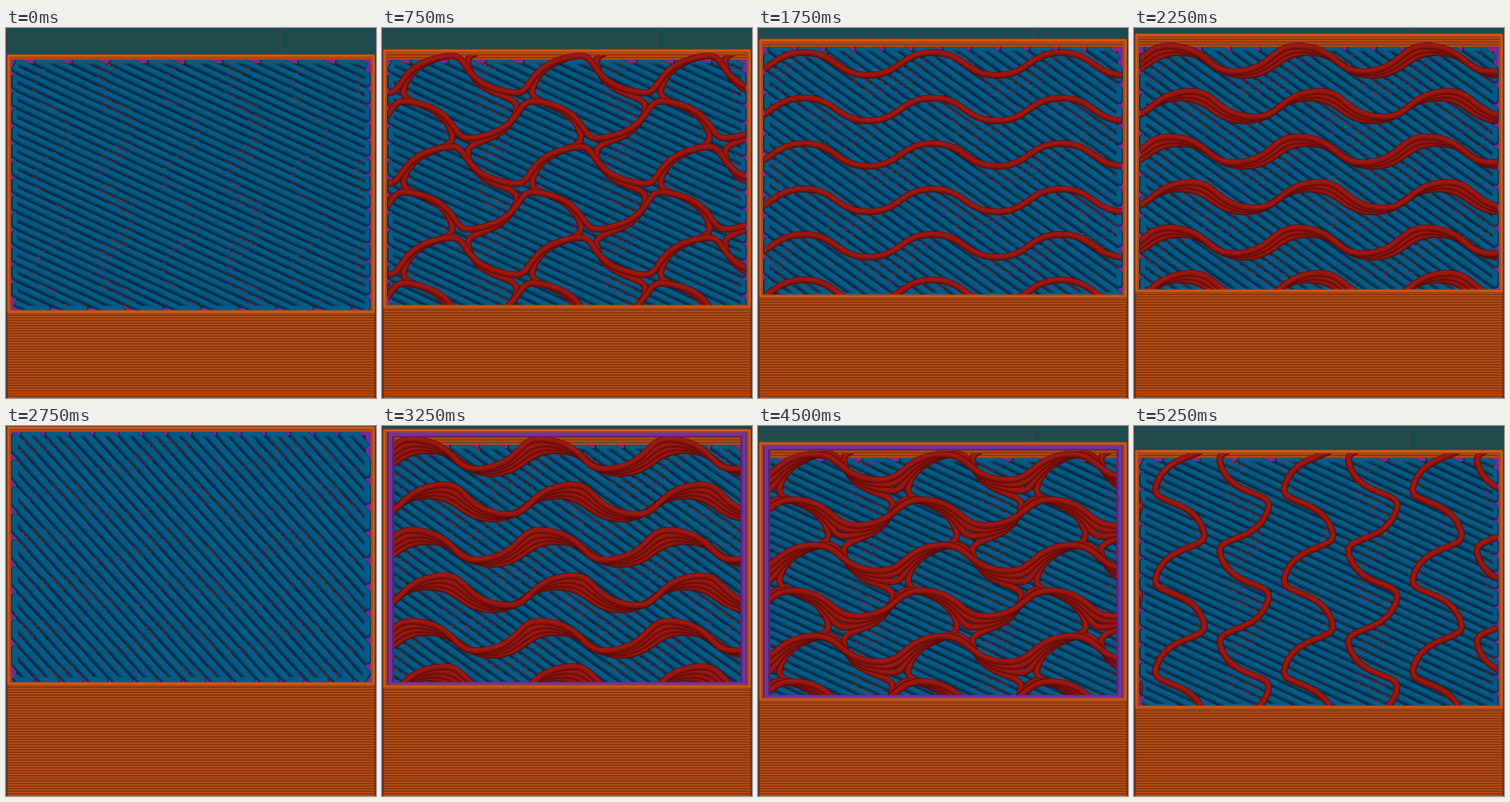
Animation, 512 px wide and 512 px high, one loop 5500 ms. Source, as an HTML page with a canvas:

```html
<!DOCTYPE html>
<html lang="en">
<head>
<meta charset="utf-8">
<title>Layer preview</title>
<style>
html, body { margin: 0; width: 100%; height: 100%; overflow: hidden; background: #1e494d; }
canvas { display: block; width: 512px; height: 512px; }
</style>
</head>
<body>
<canvas id="view" width="512" height="512"></canvas>
<script>
const ctx = document.getElementById('view').getContext('2d');
const TAU = Math.PI * 2;
const STEP = 3.6;             // screen rise of one layer
const WAVE = 178;             // gyroid period on screen
const DEPTH = WAVE * 0.707;   // same period, foreshortened
const TURN = TAU * STEP / DEPTH;

function rect(x, y, w, h, color) {
  ctx.fillStyle = color;
  ctx.fillRect(x, y, w, h);
}

function clipTo(x0, y0, x1, y1) {
  ctx.save();
  ctx.beginPath();
  ctx.rect(x0, y0, x1 - x0, y1 - y0);
  ctx.clip();
}

// Stroke a path several times, shifted, to look like a lit tube.
function tube(path, coats) {
  ctx.lineJoin = 'round';
  ctx.lineCap = 'butt';
  for (const [color, width, dx, dy] of coats) {
    ctx.save();
    ctx.translate(dx, dy);
    ctx.strokeStyle = color;
    ctx.lineWidth = width;
    ctx.stroke(path);
    ctx.restore();
  }
}

function polyline(points) {
  const path = new Path2D();
  points.forEach(([x, y], i) => i ? path.lineTo(x, y) : path.moveTo(x, y));
  return path;
}

// Slice of sin x cos y + sin y cos z + sin z cos x = 0 at one layer.
function gyroid(layer) {
  const z = (layer - 6) * TURN, s = Math.sin(z), c = Math.cos(z);
  const x0 = 19, y0 = 49.5 - (layer - 6) * STEP;
  const flat = Math.abs(s) < Math.abs(c);
  const paths = [];
  for (let n = -2; n < 9; n++) {
    const points = [];
    for (let p = -10; p <= 522; p += 2) {
      const t = TAU * (flat ? (p - x0) / WAVE : (p - y0) / DEPTH);
      const a = flat ? Math.sin(t) : Math.cos(t);
      const b = flat ? c : s;
      const k = flat ? -s * Math.cos(t) : -c * Math.sin(t);
      const lean = flat ? Math.atan2(a, b) : Math.atan2(b, a);
      const arc = Math.asin(Math.max(-1, Math.min(1, k / Math.hypot(a, b))));
      const u = n * Math.PI + (n % 2 ? -arc : arc) - lean;
      points.push(flat ? [p, y0 + u * DEPTH / TAU] : [x0 + u * WAVE / TAU, p]);
    }
    paths.push(polyline(points));
  }
  return paths;
}

function drawGyroid(layer, left, right, bottom) {
  clipTo(left, 44 - layer * STEP - 2.5, right, bottom);
  for (const path of gyroid(layer)) {
    tube(path, [
      ['#560b08', 9.2, 0, 0.3],
      ['#84120d', 7.6, 0, -0.1],
      ['#9a1912', 4.6, 0.2, -1]
    ]);
  }
  ctx.restore();
}

// One continuous zigzag filling the floor at the given layer.
function drawFloor(base, bottom) {
  const index = base / 5;
  const angle = [0.5765, 0.785, 0.994][index];
  const slope = Math.tan(angle) * 0.707;
  const pitch = 14.2 * 0.707 / Math.cos(angle);
  const width = pitch * Math.cos(Math.atan(slope));
  const top = 44 - base * STEP, end = 392.5 - base * STEP;
  const l = 12, r = 499.5, t = top + 3.5, b = end - 3.5;
  const start = [87, 89, 80][index] - pitch / 2;

  clipTo(7, top, 505, bottom);
  rect(7, top, 498, end - top, '#752c92');
  rect(14, top + 5, 484, end - top - 10, '#062a42');
  for (let k = base - 4; k < base; k++) {
    clipTo(14, top + 4, 498, end - 4);
    for (const path of gyroid(k)) tube(path, [['#5c0b08', 7, 0, 0.5], ['#b6231a', 5, 0, 0]]);
    ctx.restore();
  }
  const points = [];
  for (let n = -60; n < 60; n++) {
    const c = start + n * pitch - slope * l;
    const x1 = Math.max(l, (t - c) / slope), x2 = Math.min(r, (b - c) / slope);
    if (x1 >= x2) continue;
    const ends = [[x1, slope * x1 + c], [x2, slope * x2 + c]];
    points.push(...(n % 2 ? ends.reverse() : ends));
  }
  tube(polyline(points), [
    ['#05304c', width - 0.9, 0, 0],
    ['#064567', width - 3, 0.3, -0.8],
    ['#075a86', width - 5.4, 0.5, -1.7]
  ]);
  ctx.restore();
}

function stripes(x, from, to, w, origin) {
  const first = origin + Math.floor((from - origin) / STEP) * STEP;
  clipTo(x, from, x + w, to);
  rect(x, from, w, to - from, '#b04812');
  for (let y = first; y < to + STEP; y += STEP) {
    rect(x, y, w, 1.3, '#78310a');
    rect(x, y + 2, w, 1, '#bd5017');
  }
  ctx.restore();
}

function ring(inset, top, bottom, width, color) {
  ctx.strokeStyle = color;
  ctx.lineWidth = width;
  ctx.lineJoin = 'round';
  const h = inset * 0.75;
  ctx.strokeRect(1 + inset, top + h, 510 - 2 * inset, bottom - top - 2 * h);
}

function drawState(state) {
  const base = Math.floor(state / 5) * 5;
  const top = 36.6 - state * STEP, bottom = 394.9 - state * STEP;
  const capped = state % 5 === 4;
  const inner = bottom - 2.5;

  rect(0, 0, 512, 512, '#1e494d');
  rect(0, 0, 1, 512, '#51303a');
  rect(380, 0, 1, Math.max(0, top), '#49404a');

  stripes(1, bottom, 512, 510, 393.3);
  rect(1, bottom, 1.5, 512 - bottom, '#7a300b');
  rect(509.5, bottom, 1.5, 512 - bottom, '#7a300b');
  rect(1, top, 510, bottom - top, '#75300b');
  stripes(6, top + 4, 46 - base * STEP, 500, 36.6);

  drawFloor(base, inner);
  const left = capped ? 16 : 9, right = capped ? 497 : 503;
  for (let k = base + 1; k <= state; k++) drawGyroid(k, left, right, inner);

  if (capped) {
    const y0 = top + 4, y1 = inner;
    rect(7, y0, 10, y1 - y0, '#59246f');
    rect(496, y0, 10, y1 - y0, '#59246f');
    rect(7, y0, 499, 7, '#59246f');
    rect(7, y1 - 6, 499, 6, '#59246f');
    ctx.strokeStyle = '#77319a';
    ctx.lineWidth = 5;
    ctx.strokeRect(11.5, y0 + 3, 489.5, y1 - y0 - 6);
  }
  ring(2.2, top, bottom, 4.4, '#8a3a0d');
  ring(2.4, top, bottom, 2.6, '#cf5c1e');
  ring(5, top, bottom, 1.6, '#b84e16');
}

// Up through the layers and back, resting half a second at each end.
function stateAt(ms) {
  const t = ms % 5500;
  const up = Math.max(0, Math.floor((t - 250) / 250));
  return t < 3250 ? Math.min(10, up) : 9 - Math.floor((t - 3250) / 250);
}

let shown = -1;
const began = performance.now();
function frame() {
  const state = stateAt(performance.now() - began);
  if (state !== shown) drawState(shown = state);
  requestAnimationFrame(frame);
}
frame();
</script>
</body>
</html>
```
